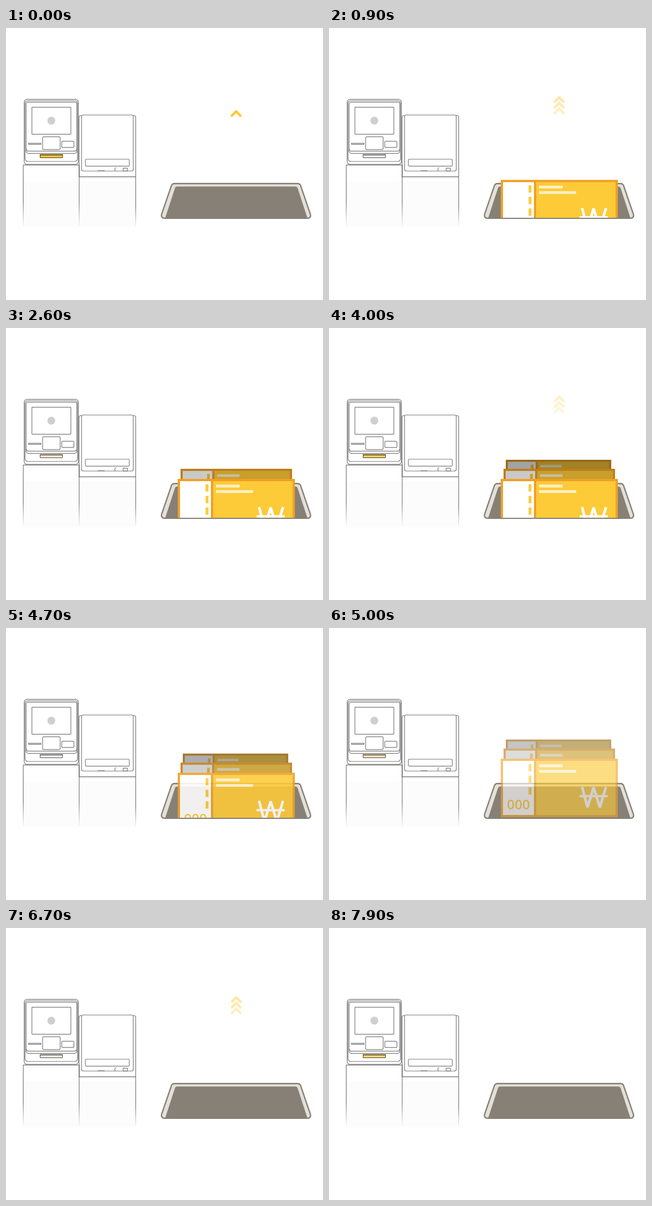
These frames come from a looping animation (563x483 px, 8 s). An HTML page with a canvas:

```html
<!DOCTYPE html>
<html lang="en">
<head>
<meta charset="utf-8">
<title>Ticket machine</title>
<style>
html, body { margin: 0; width: 100%; height: 100%; overflow: hidden; background: #fff; }
canvas { display: block; width: 563px; height: 483px; }
</style>
</head>
<body>
<canvas id="stage" width="563" height="483"></canvas>
<script>
const W = 563, H = 483, LOOP = 8000, STEP = 100;
const YELLOW = '#fdca38', ORANGE = '#f0a024', LINE = '#7b7b7b', TRAY = '#868077';
const TRAY_FLOOR = 337;

const ctx = document.getElementById('stage').getContext('2d');
const layer = document.createElement('canvas');
layer.width = W;
layer.height = H;
const bills = layer.getContext('2d');

const clamp = v => Math.min(1, Math.max(0, v));
const progress = (t, start, end) => clamp((t - start) / (end - start));
const easeInOut = p => (1 - Math.cos(Math.PI * p)) / 2;
const mix = (a, b, p) => a + (b - a) * p;

function box(x, y, w, h, r, fill) {
  ctx.beginPath();
  ctx.roundRect(x, y, w, h, r);
  if (fill) {
    ctx.fillStyle = fill;
    ctx.fill();
  }
  ctx.stroke();
}

function path(c, points, close) {
  c.beginPath();
  points.forEach(([x, y]) => c.lineTo(x, y));
  if (close) c.closePath();
}

function fadingPost(x, top) {
  const g = ctx.createLinearGradient(0, top, 0, 354);
  g.addColorStop(0, LINE);
  g.addColorStop(0.6, LINE);
  g.addColorStop(1, 'rgba(123,123,123,0)');
  ctx.fillStyle = g;
  ctx.fillRect(x - 0.6, top, 1.2, 354 - top);
}

function drawMachine(glow) {
  ctx.strokeStyle = LINE;
  ctx.lineWidth = 1.2;

  ctx.fillStyle = '#fcfcfc';
  ctx.fillRect(31, 272, 199, 82);

  box(129.8, 155.5, 100.6, 108.8, [3, 3, 0, 0], '#fff');
  box(134.2, 154.5, 91.8, 99.5, 3, '#fff');
  box(141, 233, 78, 12.3, 1.5);
  box(208, 248.8, 7.8, 5.2, 0.5);
  ctx.beginPath();
  ctx.moveTo(195.5, 247.8);
  ctx.quadraticCurveTo(191.5, 250, 194.5, 254);
  ctx.moveTo(163, 253.4);
  ctx.lineTo(175, 253.4);
  ctx.stroke();

  box(32.3, 126.6, 96.2, 115.6, 5, '#fff');
  box(33.8, 129, 93.2, 108, 5);
  box(35.6, 131.6, 90.2, 91, 4);
  path(ctx, [[35.6, 215], [38, 218.6], [123.5, 218.6], [125.8, 215]]);
  ctx.stroke();
  box(46, 140.6, 69.2, 48, 0.5);
  box(40, 204.6, 22, 2, 0);
  box(65, 193.2, 31.2, 22.6, 2, '#fff');
  box(99, 201.2, 21.6, 11, 2);

  ctx.fillStyle = '#cfcfcf';
  ctx.beginPath();
  ctx.arc(80.5, 164.5, 7, 0, 7);
  ctx.fill();

  path(ctx, [[30.3, 243.3], [130, 243.3], [130, 264.4], [230.4, 264.4]]);
  ctx.stroke();
  fadingPost(30.6, 243);
  fadingPost(130, 243);
  fadingPost(230.4, 264);

  ctx.strokeStyle = '#686868';
  box(60.6, 224.7, 39.8, 5.6, 0.5, '#fff');
  path(ctx, [[61, 226], [100, 226]]);
  ctx.stroke();
  ctx.save();
  ctx.globalCompositeOperation = 'multiply';
  ctx.globalAlpha = glow;
  ctx.fillStyle = YELLOW;
  ctx.fillRect(60, 224, 41, 7);
  ctx.restore();
}

function drawTray() {
  ctx.lineWidth = 2.4;
  ctx.strokeStyle = TRAY;
  ctx.fillStyle = '#e3e0d8';
  ctx.beginPath();
  ctx.moveTo(408, 276.2);
  ctx.arcTo(522, 276.2, 543, 338, 6);
  ctx.arcTo(543, 337.8, 408, 337.8, 5);
  ctx.arcTo(274, 337.8, 295, 276.2, 5);
  ctx.arcTo(295, 276.2, 408, 276.2, 6);
  ctx.closePath();
  ctx.fill();
  ctx.stroke();

  ctx.fillStyle = TRAY;
  ctx.beginPath();
  ctx.moveTo(408, 281.6);
  ctx.arcTo(517, 281.6, 536, 338, 4);
  ctx.lineTo(535.5, 338);
  ctx.lineTo(282.5, 338);
  ctx.arcTo(301, 281.6, 408, 281.6, 4);
  ctx.fill();
}

function drawBill(x, top, scale, shade) {
  const c = bills;
  const rect = (color, ...r) => {
    c.fillStyle = color;
    c.fillRect(...r);
  };
  c.save();
  c.translate(x, top);
  c.scale(scale, scale);
  rect(ORANGE, 0, 0, 208, 104);
  rect('#fff', 4, 4, 55, 96);
  rect(YELLOW, 63, 4, 141, 96);
  for (let i = 0; i < 3; i++) rect(YELLOW, 49.5, 9.5 + i * 20.6, 5, 13);
  rect('#fef0c4', 68, 10.2, 42, 5);
  rect('#fef0c4', 68, 20, 66, 5);

  c.fillStyle = YELLOW;
  c.font = '600 24px "Open Sans", sans-serif';
  c.textAlign = 'center';
  c.fillText('000', 31.5, 90);

  c.strokeStyle = '#fff';
  c.lineWidth = 4.6;
  c.lineJoin = 'bevel';
  path(c, [[144.5, 50], [154, 86.5], [165, 51], [176, 86.5], [187, 50]]);
  c.stroke();
  rect('#fff', 140, 64.5, 50, 4);

  rect(`rgba(0,0,0,${shade})`, 0, 0, 208, 104);
  c.restore();
}

function drawBills(t) {
  const leave = progress(t, 4330, 5430) ** 2;
  if (leave >= 1) return;
  const lift = 97 * leave;
  const rise = (from, to, start, end) =>
    mix(from, to, easeInOut(progress(t, start, end))) - lift;

  bills.clearRect(0, 0, W, H);
  if (t >= 2600) drawBill(314, rise(252, 234, 2600, 3600), 0.9, 0.36);
  if (t >= 1600) drawBill(310, rise(270, 250, 1600, 2600), 0.952, 0.21);
  drawBill(305, rise(338, 268, 0, 1000), 1, 0);

  ctx.save();
  ctx.beginPath();
  ctx.rect(0, 0, W, TRAY_FLOOR);
  ctx.clip();
  ctx.globalAlpha = 1 - leave;
  ctx.drawImage(layer, 0, 0);
  ctx.restore();
}

function drawArrows(t) {
  const phase = t % 2900;
  const drift = phase * 0.0054;
  ctx.save();
  ctx.strokeStyle = YELLOW;
  ctx.lineWidth = 4.4;
  ctx.lineCap = ctx.lineJoin = 'round';
  for (let i = 0; i < 3; i++) {
    const start = i * 150;
    if (phase < start) continue;
    const y = 148 - i * 10 - drift;
    ctx.globalAlpha = (1 - progress(phase, start, i ? 1600 : 1500)) ** 1.3;
    path(ctx, [[401.2, y + 7.7], [408.8, y], [416.4, y + 7.7]]);
    ctx.stroke();
  }
  ctx.restore();
}

function draw(t) {
  ctx.fillStyle = '#fff';
  ctx.fillRect(0, 0, W, H);
  const blink = (t + 50) % 1900;
  drawMachine(Math.abs(1 - blink / 950));
  drawTray();
  drawBills(t);
  drawArrows(t);
}

const origin = performance.now();
function tick() {
  const t = (performance.now() - origin) % LOOP;
  draw(Math.floor(t / STEP) * STEP);
  requestAnimationFrame(tick);
}
tick();
</script>
</body>
</html>
```
